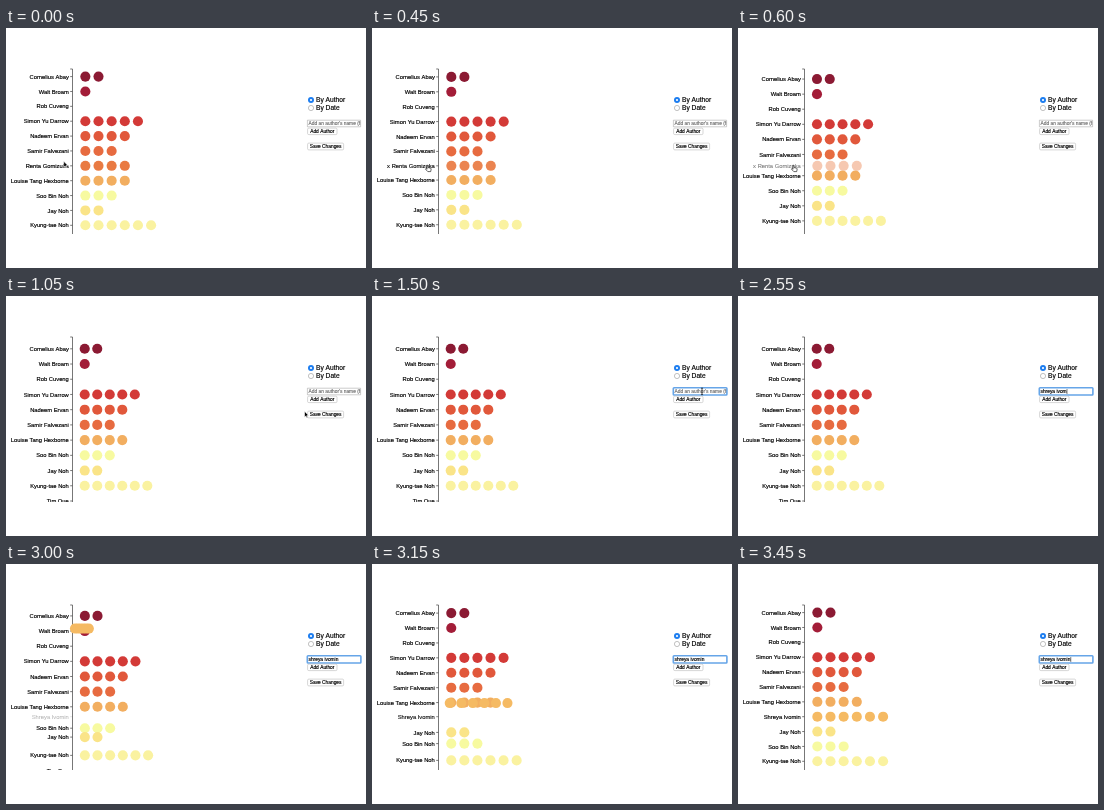
An HTML page with a canvas that plays this animation: 360x240 px, repeating every 3.6 s.

```html
<!DOCTYPE html>
<html lang="en">
<head>
<meta charset="utf-8">
<title>Authors chart</title>
<style>
html, body { margin: 0; width: 100%; height: 100%; overflow: hidden; background: #fff; }
canvas { display: block; width: 360px; height: 240px; }
</style>
</head>
<body>
<canvas id="stage"></canvas>
<script>
const W = 360, H = 240, LOOP = 3600, STEP = 150;
const FONT = '"Liberation Sans", Arial, sans-serif';
const AXIS = { x: 66.5, top: 41, bottom: 206, color: '#555' };
const DOT_RADIUS = 5.05;
const canvas = document.getElementById('stage');
const ctx = canvas.getContext('2d');
const ratio = window.devicePixelRatio || 1;
canvas.width = W * ratio;
canvas.height = H * ratio;
ctx.scale(ratio, ratio);

// slots: row index with the full list, after the removal, after the addition
const authors = [
  { name: 'Cornelius Abay', books: 2, color: '#8b1a33', slots: [0, 0, 0] },
  { name: 'Walt Broam', books: 1, color: '#a31d38', slots: [1, 1, 1] },
  { name: 'Rob Cuveng', books: 0, color: '#b82438', slots: [2, 2, 2] },
  { name: 'Simon Yu Darrow', books: 5, color: '#d33a37', slots: [3, 3, 3] },
  { name: 'Nadeem Ervan', books: 4, color: '#e1583b', slots: [4, 4, 4] },
  { name: 'Samir Falvezani', books: 3, color: '#e76b40', slots: [5, 5, 5] },
  { name: 'Renta Gomizuka', books: 4, color: '#e97a42', slots: [6, null, null] },
  { name: 'Louise Tang Hexborne', books: 4, color: '#f2ae60', slots: [7, 6, 6] },
  { name: 'Shreya Ivomin', books: 6, color: '#f5ba63', slots: [null, null, 7] },
  { name: 'Soo Bin Noh', books: 3, color: '#f7faa0', slots: [8, 7, 9] },
  { name: 'Jay Noh', books: 2, color: '#fae488', slots: [9, 8, 8] },
  { name: 'Kyung-tae Noh', books: 6, color: '#faf2a0', slots: [10, 9, 10] },
  { name: 'Tim Oue', books: 0, color: '#faf2a0', slots: [11, 10, 11] }
];
const layouts = [
  { top: 48.6, row: 14.87, dot: 13.15 },
  { top: 52.8, row: 15.22, dot: 12.52 },
  { top: 48.6, row: 14.87, dot: 13.15 }
];
const typed = 'shreya ivomin';

const clamp = v => Math.max(0, Math.min(1, v));
const mix = (a, b, p) => a + (b - a) * p;
const cubic = t => t < 0.5 ? 4 * t ** 3 : 1 - (2 - 2 * t) ** 3 / 2;
const progress = (t, start, length) => cubic(clamp((t - start) / length));
const rowY = (layout, slot) => layout.top + layout.row * slot;

// a hairline outline gives the slightly heavy look of smoothed screen text
function text(str, x, y, size, color = '#000', align = 'left') {
  ctx.font = `${size}px ${FONT}`;
  ctx.textAlign = align;
  ctx.fillStyle = ctx.strokeStyle = color;
  ctx.lineWidth = 0.16;
  ctx.fillText(str, x, y);
  ctx.strokeText(str, x, y);
}

function line(x1, y1, x2, y2, color = '#000', width = 0.8) {
  ctx.strokeStyle = color;
  ctx.lineWidth = width;
  ctx.beginPath();
  ctx.moveTo(x1, y1);
  ctx.lineTo(x2, y2);
  ctx.stroke();
}

function disc(x, y, r, color) {
  ctx.fillStyle = color;
  ctx.beginPath();
  ctx.arc(x, y, r, 0, 7);
  ctx.fill();
}

function box(x, y, w, h, r, color, width) {
  ctx.beginPath();
  ctx.roundRect(x, y, w, h, r);
  ctx.fillStyle = '#fff';
  ctx.fill();
  ctx.strokeStyle = color;
  ctx.lineWidth = width;
  ctx.stroke();
}

function drawRow(author, y, dotStep, alpha, spread, hovered) {
  ctx.globalAlpha = alpha;
  line(64.2, y, AXIS.x, y, AXIS.color);
  text((hovered ? 'x ' : '') + author.name, 62.8, y + 2.1, 5.8, '#000', 'right');
  // new dots fly out of the axis origin at full strength
  if (spread < 1) ctx.globalAlpha = 1;
  for (let k = 1; k <= author.books; k++) {
    disc(66.2 + dotStep * k * spread, mix(AXIS.top, y, spread), DOT_RADIUS, author.color);
  }
  ctx.globalAlpha = 1;
}

function drawChart(t) {
  const phase = t < 2800 ? 0 : 1;
  const p = phase ? progress(t, 2820, 480) : progress(t, 300, 565);
  const from = layouts[phase], to = layouts[phase + 1];
  const dotStep = mix(from.dot, to.dot, p);

  ctx.save();
  ctx.beginPath();
  ctx.rect(0, 0, 290, AXIS.bottom);
  ctx.clip();
  line(AXIS.x, AXIS.top, AXIS.x, AXIS.bottom, AXIS.color);
  line(64.2, AXIS.top, AXIS.x, AXIS.top, AXIS.color);
  for (const author of authors) {
    const a = author.slots[phase], b = author.slots[phase + 1];
    if (a !== null && b !== null) {
      drawRow(author, mix(rowY(from, a), rowY(to, b), p), dotStep, 1, 1);
    } else if (a !== null && p < 1) {
      drawRow(author, rowY(from, a), from.dot, 1 - p, 1, t >= 150);
    } else if (b !== null && p > 0.01) {
      drawRow(author, rowY(to, b), to.dot, p, p);
    }
  }
  ctx.restore();
}

function drawRadio(y, label, on) {
  if (on) {
    disc(305, y, 3, '#1c7df0');
    disc(305, y, 1.1, '#fff');
  } else {
    box(302.4, y - 2.6, 5.2, 5.2, 2.6, '#999', 0.6);
  }
  text(label, 310, y + 2.2, 6.65);
}

function drawButton(x, y, w, h, label) {
  box(x, y, w, h, 1.2, '#bbb', 0.6);
  text(label, x + w / 2, y + h / 2 + 1.7, 4.85, '#000', 'center');
}

function drawInput(t) {
  const focused = t >= 1500;
  if (focused) box(301.3, 91.8, 53.6, 7.2, 0.8, '#66a5e8', 1.6);
  else box(301.4, 92.2, 53.2, 6.6, 0, '#aaa', 0.6);
  ctx.save();
  ctx.beginPath();
  ctx.rect(302, 91, 52.2, 9);
  ctx.clip();
  const count = Math.round(clamp((t - 1650) / 1050) * typed.length);
  if (count) {
    const str = typed.slice(0, count);
    text(str, 302.5, 97.2, 4.85);
    const end = 302.9 + ctx.measureText(str).width;
    if (t < 2850 || t >= 3450) line(end, 93, end, 98, '#000', 0.5);
  } else {
    text("Add an author's name (first last)", 302.6, 97.2, 4.85, '#707070');
  }
  ctx.restore();
}

function drawPanel(t) {
  drawRadio(72, 'By Author', true);
  drawRadio(80, 'By Date', false);
  drawInput(t);
  drawButton(301.6, 100.1, 29.4, 6.5, 'Add Author');
  drawButton(301.6, 115.1, 36, 6.8, 'Save Changes');
}

function polygon(x, y, points, fill, stroke) {
  ctx.beginPath();
  points.forEach(([dx, dy]) => ctx.lineTo(x + dx, y + dy));
  ctx.closePath();
  ctx.fillStyle = fill;
  ctx.fill();
  ctx.strokeStyle = stroke;
  ctx.lineWidth = 0.6;
  ctx.stroke();
}

const arrow = [[0, 0], [0, 6], [1.4, 4.8], [2.3, 6.8], [3.2, 6.4], [2.3, 4.4], [4.1, 4.3]];
const hand = [[0, 0], [0.9, 0], [1.3, 2.4], [3.6, 2.9], [4.4, 3.7], [3.9, 6.4],
  [1, 6.4], [-1.4, 3.9], [-0.9, 3.2], [0.3, 4]];

function drawCursor(t) {
  if (t < 150) polygon(57.7, 133.2, arrow, '#000', '#fff');
  else if (t < 750) polygon(54.8, 137.2, hand, '#fff', '#000');
  else if (t < 1200) {
    const p = clamp((t - 600) / 450);
    polygon(mix(55, 298.5, p), mix(137, 115.2, p), arrow, '#000', '#fff');
  } else if (t < 1500) {
    const p = (t - 1050) / 450;
    polygon(mix(298.5, 330, p), mix(115.2, 92, p), arrow, '#000', '#fff');
  } else if (t < 1650) {
    line(330, 92.3, 330, 98.5, '#000', 0.7);
    line(328.9, 92.2, 331.1, 92.2, '#000', 0.6);
    line(328.9, 98.6, 331.1, 98.6, '#000', 0.6);
  }
}

function render(now) {
  const t = Math.floor((now % LOOP) / STEP) * STEP;
  ctx.fillStyle = '#fff';
  ctx.fillRect(0, 0, W, H);
  drawChart(t);
  drawPanel(t);
  drawCursor(t);
}

let origin = null;
function tick(now) {
  origin ??= now;
  render(now - origin);
  requestAnimationFrame(tick);
}
render(0);
requestAnimationFrame(tick);
</script>
</body>
</html>
```
